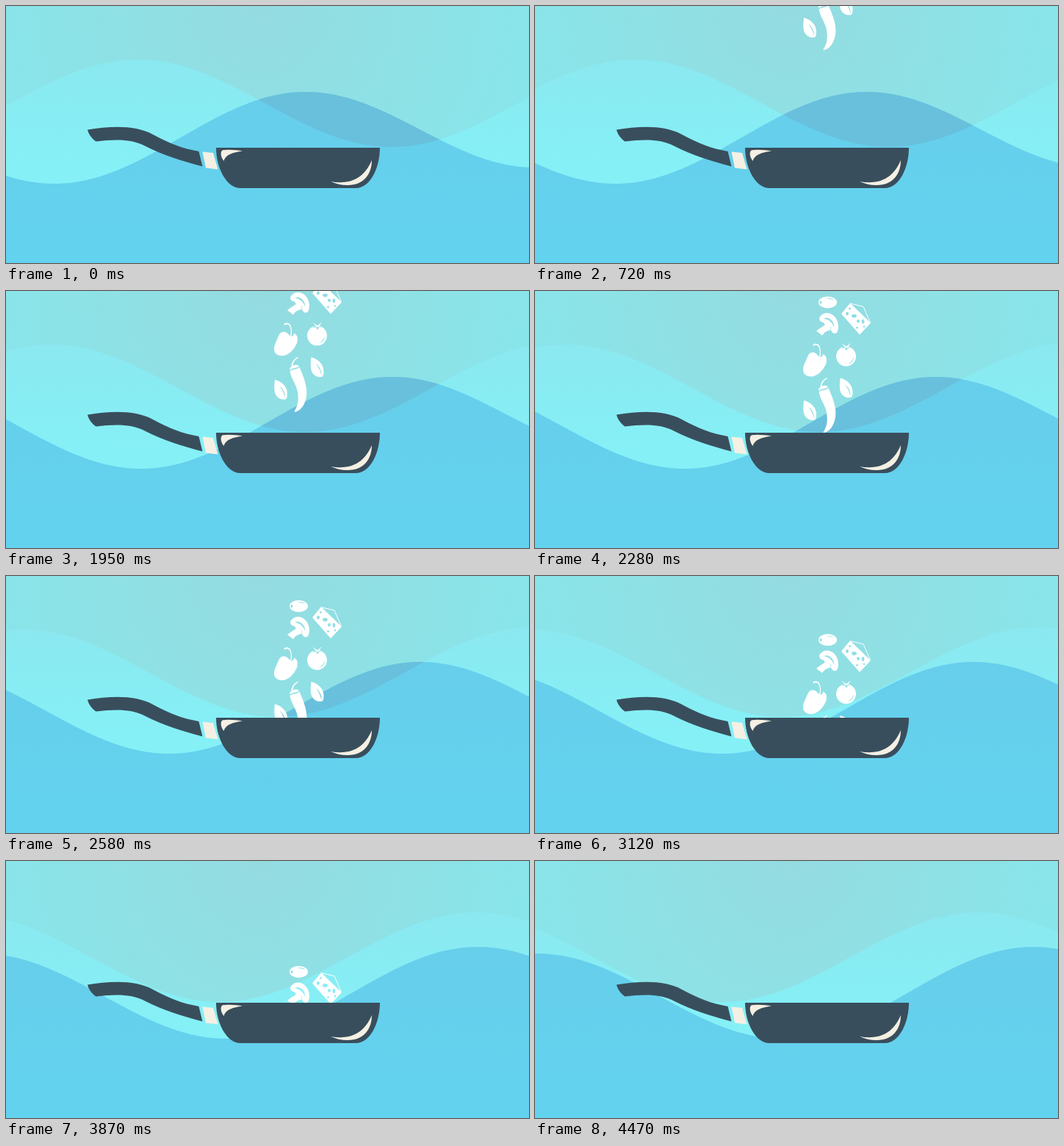
Animation of 712 by 350 pixels, one loop 4.5 s. Source, as an HTML page with a canvas:

```html
<!DOCTYPE html>
<html lang="en">
<head>
<meta charset="utf-8">
<title>Frying pan</title>
<style>
html, body { margin: 0; width: 100%; height: 100%; overflow: hidden; background: #87e7ea; }
canvas { display: block; }
</style>
</head>
<body>
<canvas id="stage" width="712" height="350"></canvas>
<script>
const W = 712, H = 350, LOOP = 4500, STEP = 30;
const WAVE_SPEED = 0.0605, FALL_SPEED = 0.0852, RIM = 193;
const ctx = document.getElementById('stage').getContext('2d');

// Turning points of each wave at the start of the loop.
const frontWave = [[-268, 126], [66, 242], [408, 117], [720, 220]];
const backWave = [[-176, 197], [180, 73], [525, 192], [874, 70], [1220, 192]];

function waveY(points, u) {
  let i = 0;
  while (i < points.length - 2 && u > points[i + 1][0]) i++;
  const [x0, y0] = points[i], [x1, y1] = points[i + 1];
  return y0 + (y1 - y0) * (1 - Math.cos(Math.PI * (u - x0) / (x1 - x0))) / 2;
}

// Region between a wave and the horizontal line at edgeY.
function waveRegion(points, shift, edgeY) {
  const p = new Path2D();
  p.moveTo(-2, edgeY);
  for (let x = -2; x <= W + 2; x += 2) p.lineTo(x, waveY(points, x - shift));
  p.lineTo(W + 2, edgeY);
  p.closePath();
  return p;
}

function addStops(gradient, colors) {
  colors.forEach((c, i) => gradient.addColorStop(i / (colors.length - 1), c));
  return gradient;
}

const sky = addStops(ctx.createRadialGradient(345, 0, 0, 345, 0, 400), ['#94dbe0', '#8ee1e5', '#87e6eb']);
const light = addStops(ctx.createLinearGradient(0, 70, 0, 215), ['#8be8f0', '#85f0f6']);
const water = addStops(ctx.createLinearGradient(0, 115, 0, 300), ['#67ceeb', '#63d2ee']);
const overlap = '#69c0dc', iron = '#394e5c', cream = '#f5f0e3';

const leaf = new Path2D('M.5 0C9 2 18 9 17.5 20C17.5 23 17 25 15.5 26.5C8 28 3 24 1 19C-1 13 0 6 .5 0Z' +
  'M7 9C12 12 15 19 14.5 25.5C13.5 20 11 14 7 9Z');

const chili = [
  'M386.5 163C390 160 396 161 399.5 157.5C405 170 411 185 409 197C407 210 400 218 392.5 218.5C392 217.5 394 216 395 213C399 205 398 195 396 187C393 178 388 172 386.5 163Z',
  'M386 161.5C386 156 391 154 397 154.5L399 156.5C395 159 390 158.5 386 161.5Z',
  'M388.5 156C389 149 393 145.5 398 143.5V144.8C394 147 391 150 390.3 155.5Z'
];

const pepper = [
  'M384 112C379 107 373 109 371 115C369 121 365 126 365 133C365 139 370 142 376 142C384 142 392 134 396 125C398 119 397 113 392 111.5C391.5 116 388 117.5 384 112Z',
  'M386.8 115C389 109 387.5 103 385 100C383 98.5 381 99.5 379 100.5L378.5 98.5C381 96.5 386 96.5 387.5 101C389.5 106 389.5 111 388.3 115.5Z'
];

const tomato = [
  'M410 114.5A13.5 13.5 0 1 1 437 114.5A13.5 13.5 0 1 1 410 114.5Z' +
  'M417 103.5L422 103L424 107L426 103L431 104L426 102L424 103L420 101.5Z' +
  'M434 115C434 120 431 124 426 125C430 123 433 119 434 115Z',
  'M417 96.5L424 101L430 96L426 102.2L423 102.5Z'
];

const mushroom = [
  'M387.5 61C393 53.5 402 54 408 60.5C414 67 414 77 411 82C408 84.5 404.5 83 403 79C404 74 400 69 394 68.5C389 68.5 386 65 387.5 61Z' +
  'M393 63C399 60 407 65 407.5 75C405 70 403 68 402 67C400 65 397 64 393 63Z',
  'M396 69.5C395 73 390 74 383 80L391 86C396 79 399 80 402.5 78.5C403 74 400 70 396 69.5Z',
  'M397 64.5L404.5 72L399 77L393 69Z'
];

const olive = [
  'M386 41A12.5 8 0 1 1 411 41A12.5 8 0 1 1 386 41ZM387.5 41A1.5 2 0 1 1 390.5 41A1.5 2 0 1 1 387.5 41Z' +
  'M397 35.5C401 35 405 36 408 38C404 37 401 36.5 397 35.5Z'
];

const toPaths = list => list.map(d => new Path2D(d));

function makeCheese() {
  const face = new Path2D('M429 42L417 56.5L442 85L457 69Z');
  const holes = [[425, 56.5, 2, 2.4], [434.5, 59.5, 3.4, 2.4], [440, 66.5, 2, 2.2],
    [446.5, 67, 1.8, 3], [438.5, 75.5, 1.6, 1.2], [428.5, 49.5, 1.6, 1.2], [448, 74, 1.3, 1.3]];
  for (const [x, y, rx, ry] of holes) {
    face.moveTo(x + rx, y);
    face.ellipse(x, y, rx, ry, 0, 0, Math.PI * 2);
  }
  return face;
}

const food = [chili, pepper, tomato, mushroom, olive].flatMap(toPaths);
food.push(makeCheese());
for (const [x, y] of [[365.5, 174.5], [415, 144]]) {
  const p = new Path2D();
  p.addPath(leaf, new DOMMatrix([1, 0, 0, 1, x, y]));
  food.push(p);
}
const cheeseTop = new Path2D('M429 42.5L447 46.8L456.5 68.5');

const pan = [
  [iron, 'M286 193H509C509 220 496 248 476 248H319C300 248 286 220 286 193Z'],
  [iron, 'M111 168.5C140 164 175 161 200 175C222 187 240 194 262.5 198L267.5 218.5C240 211 213 203 190 191C170 180 145 182 122.5 184.5C117 181 112 174 111 168.5Z'],
  [cream, 'M267.5 198.5L282 200L288.5 222.5L272 220.5Z'],
  [cream, 'M295 196.2C303 195 314 196 322 197.5C309 199.5 299 202 296.5 211C292.5 206 291 198.5 295 196.2Z'],
  [cream, 'M498 210C498 228 488 244 465 244C456 244 449 242 442 239C465 243 486 238 498 210Z']
].map(([color, d]) => [color, new Path2D(d)]);

function fill(color, path) {
  ctx.fillStyle = color;
  ctx.fill(path, 'evenodd');
}

function drawWaves(t) {
  const shift = WAVE_SPEED * t;
  const front = waveRegion(frontWave, shift, H + 2);
  fill(light, waveRegion(backWave, -shift, H + 2));
  fill(water, front);
  ctx.save();
  ctx.clip(front);
  fill(overlap, waveRegion(backWave, -shift, -2));
  ctx.restore();
}

function drawFood(t) {
  ctx.save();
  ctx.beginPath();
  ctx.rect(0, 0, W, RIM);
  ctx.clip();
  ctx.translate(0, FALL_SPEED * (t - 2580));
  for (const p of food) fill('#fff', p);
  ctx.strokeStyle = '#fff';
  ctx.lineWidth = 1;
  ctx.stroke(cheeseTop);
  ctx.restore();
}

function draw(t) {
  ctx.fillStyle = sky;
  ctx.fillRect(0, 0, W, H);
  drawWaves(t);
  drawFood(t);
  for (const [color, path] of pan) fill(color, path);
}

let start;
function tick(now) {
  start ??= now;
  draw(Math.floor(((now - start) % LOOP) / STEP) * STEP);
  requestAnimationFrame(tick);
}
draw(0);
requestAnimationFrame(tick);
</script>
</body>
</html>
```
